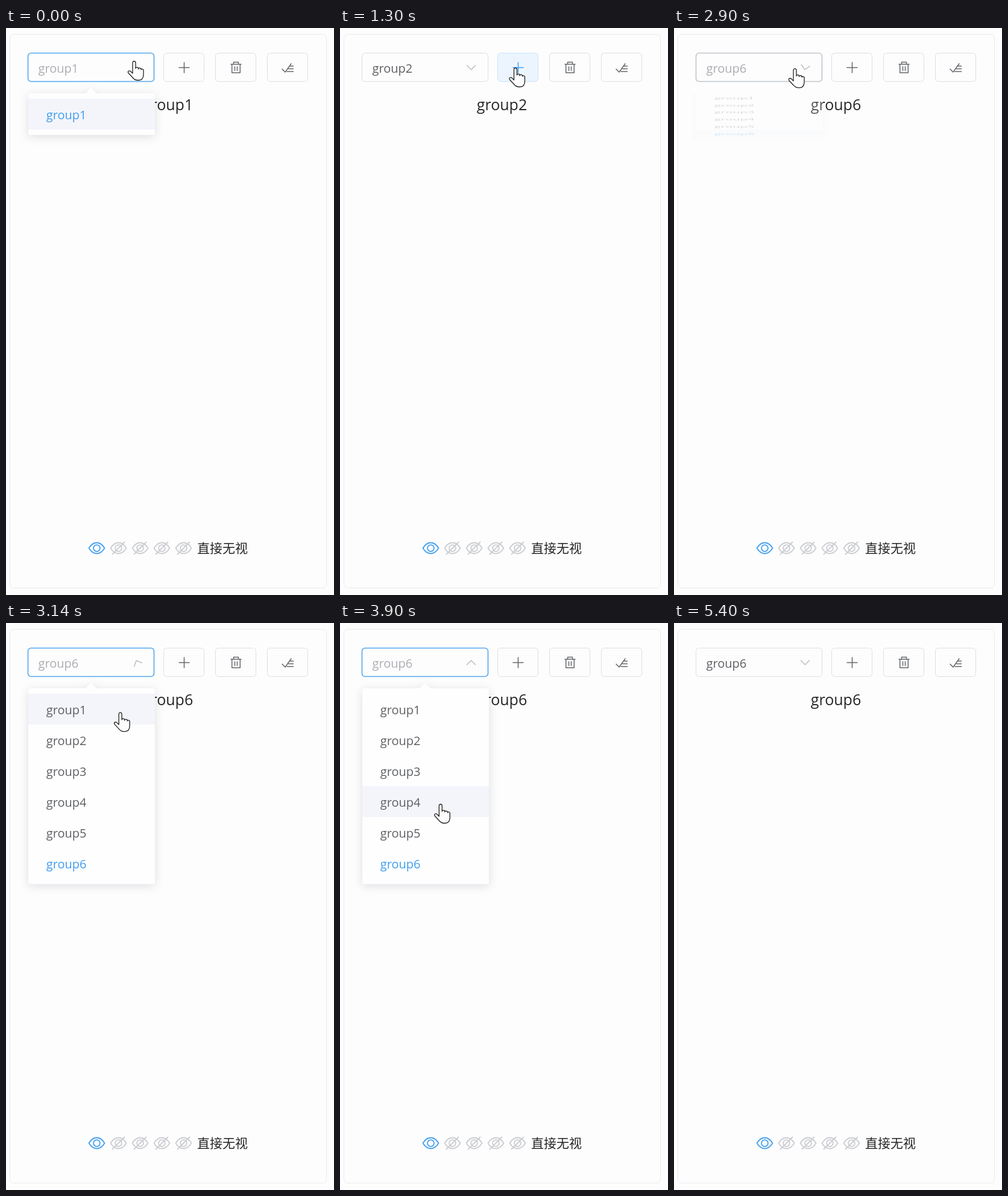
An HTML page for the animation above (5.43 s loop, 544 px wide and 938 px high).

```html
<!DOCTYPE html>
<html lang="zh">
<head>
<meta charset="utf-8">
<style>
  html, body { margin: 0; width: 100%; height: 100%; overflow: hidden; background: #fdfdfd; }
  svg { display: block; width: 544px; height: 938px; }
  text { font: 20px "Open Sans", "Noto Sans", sans-serif; fill: #5e6064; }
  #title { font-size: 25px; fill: #262626; }
  #caption { font: 21px "Noto Sans CJK SC", "Noto Sans CJK", sans-serif; fill: #262626; }
  .line { fill: none; stroke-linecap: round; stroke-linejoin: round; }
  .box { fill: #fdfdfd; stroke: #dcdfe4; }
  .icon { stroke: #66686c; stroke-width: 1.5; }
  .hover .box { fill: #ecf5fe; stroke: #c8e2fb; }
  .hover .icon { stroke: #409eff; }
  #popup { filter: drop-shadow(0 3px 8px rgba(0, 0, 30, .12)); }
  .pointer { fill: #fdfdfd; stroke: #222; stroke-width: 1.3; stroke-linejoin: round; }
</style>
</head>
<body>
<svg viewBox="0 0 544 938">
  <defs>
    <g id="eye" class="line" stroke-width="1.8">
      <path d="M-13 0Q-7.5-9 0-9T13 0Q7.5 9 0 9T-13 0Z"/>
      <circle r="5.4"/>
    </g>
    <g id="hidden" class="line" stroke="#cbcdd2">
      <use href="#eye"/>
      <path stroke-width="1.8" d="M-10 10L10-10"/>
    </g>
  </defs>
  <rect x="6.5" y="10.5" width="525" height="916" rx="6" fill="none" stroke="#e9ebf0"/>

  <rect id="select" class="box" x="36.5" y="41.5" width="209" height="47" rx="5"/>
  <text id="value" x="53.5" y="74"></text>
  <path id="chevron" class="line" d="M-7-3.5L0 3.5L7-3.5" stroke="#bcbfc6" stroke-width="1.6"/>

  <g id="add">
    <rect class="box" x="261.5" y="41.5" width="67" height="47" rx="5"/>
    <path class="line icon" d="M287 65.5h17M295.5 57v17"/>
  </g>
  <rect class="box" x="347.5" y="41.5" width="67" height="47" rx="5"/>
  <path class="line icon" d="M373 60h17M377.5 60v-3.5h8V60M374.7 60v14h13.6V60M379.5 64v6.5M383.5 64v6.5"/>
  <rect class="box" x="433.5" y="41.5" width="67" height="47" rx="5"/>
  <path class="line icon" d="M458 68l5 5l10-14M471 63h5.5M468.5 67.5h8M466 72h10.5"/>

  <text id="title" x="268.5" y="136" text-anchor="middle"></text>
  <use href="#eye" x="150.5" y="860.5" stroke="#46a0ee"/>
  <use href="#hidden" x="186.5" y="860.5"/>
  <use href="#hidden" x="222.5" y="860.5"/>
  <use href="#hidden" x="258.5" y="860.5"/>
  <use href="#hidden" x="294.5" y="860.5"/>
  <text id="caption" x="317" y="868">直接无视</text>

  <g id="popup">
    <path id="panel" fill="#fefefe"/>
    <rect id="highlight" x="37" width="210" height="51" fill="#f4f5fb"/>
    <g id="items"></g>
  </g>

  <path id="hand" class="pointer" d="M-1.5 20V3Q-1.5 0 1 0T3.5 3V12Q3.5 10 6 10.2T8 13Q8 11 10.5 11.3T12.5 14Q13 12.3 15 13T16.5 16V22Q16.5 31.5 8 31.5Q2 31.5-1 27.5L-8.5 19.5Q-10 17-8 16Q-6 15.3-4.5 17Z"/>
  <path id="arrow" class="pointer" d="M0 0V23L5 18.5L9 26.5L13 24.5L9.5 17H17Z"/>
</svg>
<script>
const LOOP = 5430, ROW = 51, FADE = 300;
const OPEN = 2882, CLOSE_FIRST = 300, CLOSE_LAST = 4850, LEAVE = 5200;
const clicks = [1050, 1450, 1850, 2180, 2450];
// time, x, y of the pointer
const path = [
  [0, 211.5, 55], [300, 211.5, 56], [700, 278.5, 64.5], [1050, 290, 66],
  [2500, 290, 66], [2850, 199.5, 67], [2960, 199.5, 68], [3500, 158, 374],
  [3680, 160, 398], [4200, 175, 145], [4400, 378.5, 210], [4500, 378.5, 208],
  [4800, 335, 185], [4900, 333, 180], [LEAVE, 328, 15]
];
const $ = id => document.getElementById(id);
const clamp = v => Math.min(1, Math.max(0, v));
const easeOut = v => 1 - (1 - v) ** 4;
const smooth = v => v * v * (3 - 2 * v);

const items = Array.from({ length: 6 }, (_, i) => {
  const item = document.createElementNS('http://www.w3.org/2000/svg', 'text');
  item.setAttribute('x', 66.7);
  item.setAttribute('y', 151 + ROW * i);
  item.textContent = 'group' + (i + 1);
  return $('items').appendChild(item);
});

function pointerAt(t) {
  const i = path.findIndex(p => p[0] > t);
  if (i < 0) return path.at(-1).slice(1);
  const [t0, x0, y0] = path[i - 1], [t1, x1, y1] = path[i];
  const k = smooth((t - t0) / (t1 - t0));
  return [x0 + (x1 - x0) * k, y0 + (y1 - y0) * k];
}

function openness(t, ease) {
  const since = from => ease(clamp((t - from) / FADE));
  if (t < OPEN) return 1 - since(CLOSE_FIRST);
  return t < CLOSE_LAST ? since(OPEN) : 1 - since(CLOSE_LAST);
}

function drawPopup(t, shown, count, y) {
  const bottom = 126 + ROW * count;
  $('panel').setAttribute('d', `M41 108H132L141 99L150 108H243Q247 108 247 112V${bottom - 4}Q247 ${bottom} 243 ${bottom}H41Q37 ${bottom} 37 ${bottom - 4}V112Q37 108 41 108Z`);
  $('popup').setAttribute('transform', `translate(0 108) scale(1 ${shown}) translate(0 -108)`);
  $('popup').style.opacity = shown;
  $('popup').style.display = shown > .004 ? '' : 'none';

  let row = Math.floor((y - 123) / ROW);
  if (row < 0) row = count - 1;
  row = t > 4200 ? 0 : Math.min(row, count - 1);
  $('highlight').setAttribute('y', 117 + ROW * row);
  items.forEach((item, i) => {
    item.style.display = i < count ? '' : 'none';
    item.style.fill = i === count - 1 ? '#409eee' : '';
  });
}

function draw(t) {
  const [x, y] = pointerAt(t);
  const count = 1 + clicks.filter(c => c <= t).length;
  const open = t < CLOSE_FIRST || (t >= OPEN && t < CLOSE_LAST);
  const inBar = y > 41 && y < 89;
  const onSelect = inBar && x > 36 && x < 246;
  const onAdd = inBar && x > 261 && x < 329;
  const onPopup = open && x > 37 && x < 247 && y > 108;
  const focused = t < clicks[0] || (t > OPEN + 40 && t < CLOSE_LAST);

  $('value').textContent = $('title').textContent = 'group' + count;
  $('value').style.fill = open ? '#abadb3' : '';
  $('select').style.stroke = focused ? '#55a8ee' : onSelect ? '#c0c4cc' : '';
  $('select').style.strokeWidth = focused || onSelect ? 1.6 : 1;
  $('chevron').setAttribute('transform', `translate(217.5 65.5) rotate(${180 * openness(t, v => v)})`);
  $('chevron').style.display = t < CLOSE_FIRST ? 'none' : '';
  $('add').setAttribute('class', onAdd ? 'hover' : '');
  drawPopup(t, openness(t, easeOut), count, y);

  const hand = onSelect || onAdd || onPopup;
  for (const id of ['hand', 'arrow']) {
    $(id).setAttribute('transform', `translate(${x} ${y})`);
    $(id).style.display = t < LEAVE && hand === (id === 'hand') ? '' : 'none';
  }
}

const start = performance.now();
function tick() {
  draw((performance.now() - start) % LOOP);
  requestAnimationFrame(tick);
}
tick();
</script>
</body>
</html>
```
